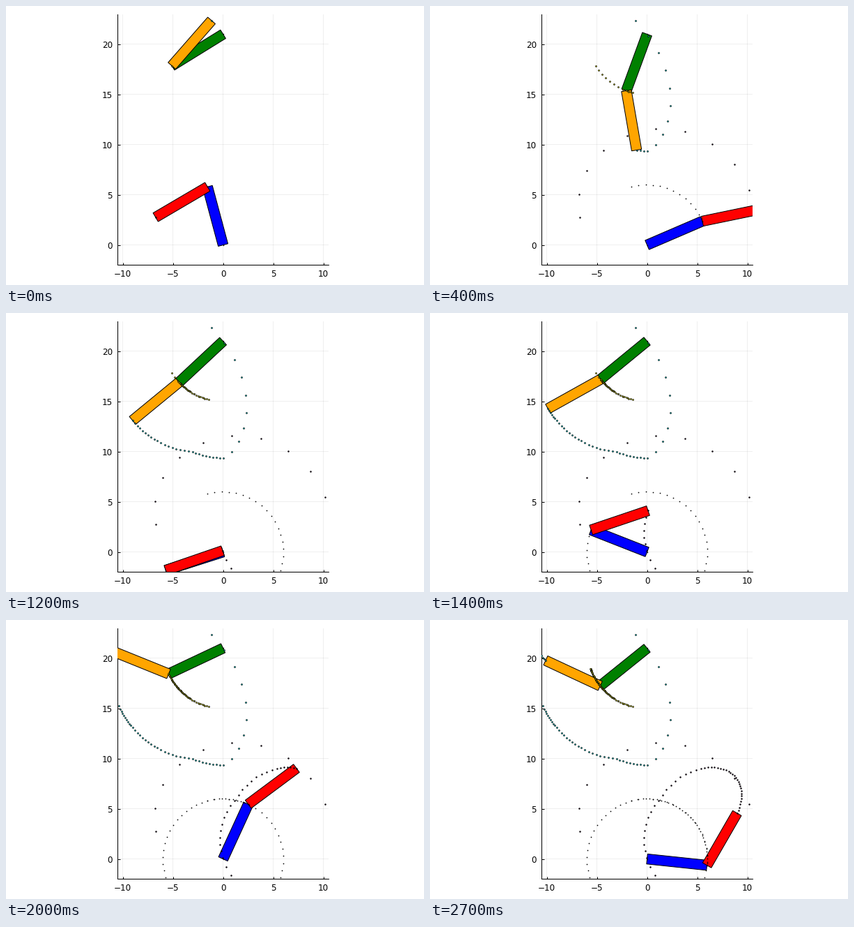
A matplotlib script for the animation above (2.8 s loop, 600 by 400 pixels).

```python
import numpy as np
import matplotlib.pyplot as plt
from matplotlib.animation import FuncAnimation
from matplotlib.patches import Polygon

W, H, DPI = 600, 400, 100
PX = 72 / DPI            # one pixel in points
FRAMES, SUBSTEPS = 28, 3
LENGTH, HALF = 6.0, 0.5

steps = np.arange((FRAMES - 1) * SUBSTEPS + 1)


def joint_path(*degrees):
    """Constant-speed moves between waypoints evenly spaced in time."""
    at = np.linspace(0, steps[-1], len(degrees))
    return np.radians(np.interp(steps, at, degrees))


def link(base, theta):
    """Far end of a link hinged at base."""
    return base + LENGTH * np.column_stack([np.cos(theta), np.sin(theta)])


def bar(a, b):
    """Corners of the bar that runs from a to b."""
    d = (b - a) / np.hypot(*(b - a))
    n = HALF * np.array([-d[1], d[0]])
    return np.array([a + n, b + n, b - n, a - n])


class Arm:
    """Two links on a fixed pivot, with a dotted trail behind each end."""

    def __init__(self, ax, pivot, paths, bar_colors, dot_colors, dot_sizes):
        points = [np.tile(pivot, (len(steps), 1))]
        for theta in paths:
            points.append(link(points[-1], theta))
        self.points = points
        self.bars = [
            ax.add_patch(Polygon(bar(a[0], b[0]), facecolor=color,
                                 edgecolor="black", linewidth=PX,
                                 joinstyle="miter", zorder=3))
            for a, b, color in zip(points, points[1:], bar_colors)]
        self.trails = [
            ax.plot([], [], "o", color=color, markersize=size * PX,
                    markeredgecolor="black", markeredgewidth=0.8 * PX,
                    snap=False, zorder=4)[0]
            for color, size in zip(dot_colors, dot_sizes)]
        ax.plot(*pivot, "o", color="black", markersize=1.5 * PX,
                markeredgewidth=0, snap=False, zorder=4)

    def pose(self, now):
        for patch, a, b in zip(self.bars, self.points, self.points[1:]):
            patch.set_xy(bar(a[now], b[now]))
        for dots, path in zip(self.trails, self.points[1:]):
            dots.set_data(*path[:now + 1].T)


plt.rcParams["font.family"] = "DejaVu Sans"
fig = plt.figure(figsize=(W / DPI, H / DPI), dpi=DPI, facecolor="white")
ax = fig.add_axes([160.4 / W, 28.6 / H, 302.4 / W, 359.8 / H])
ax.set_xlim(-10.5, 10.5)
ax.set_ylim(-2, 23)
ax.set_xticks(range(-10, 11, 5))
ax.set_yticks(range(0, 21, 5))
ax.set_axisbelow(True)
ax.grid(color="black", alpha=0.1, linewidth=0.6 * PX, snap=False)
ax.tick_params(direction="in", length=3.5 * PX, width=PX, labelsize=12 * PX)
ax.tick_params(axis="x", pad=6.5 * PX)
ax.tick_params(axis="y", pad=7.5 * PX)
for line in ax.get_xticklines() + ax.get_yticklines():
    line.set_snap(False)
ax.spines[["top", "right"]].set_visible(False)
ax.spines[["left", "bottom"]].set_linewidth(PX)

blue = joint_path(105, 43.7, -17.6, -85, -162.3, -221, -272, -306, -336, -366)
red = joint_path(210.4, 13, 9, 13.5, 19, 18.5, 30, 40, 50, 60)
green = joint_path(211.7, 256.3, 237, 229, 223, 217.5, 211, 202.4, 200, 218.8)
orange = joint_path(48.8, -76.3, -88, -116, -140.6, -156, -186, -210, -203,
                    -205)

arms = [
    Arm(ax, (0, 0), (blue, red), ("blue", "red"),
        ("black", "#4a2a4a"), (0.9, 1.6)),
    Arm(ax, (0, 21), (green, orange), ("green", "orange"),
        ("yellow", "cyan"), (1.8, 1.8)),
]


def draw(frame):
    for arm in arms:
        arm.pose(frame * SUBSTEPS)


anim = FuncAnimation(fig, draw, frames=FRAMES, interval=100, repeat=True,
                     repeat_delay=0, blit=False)
plt.show()
```
